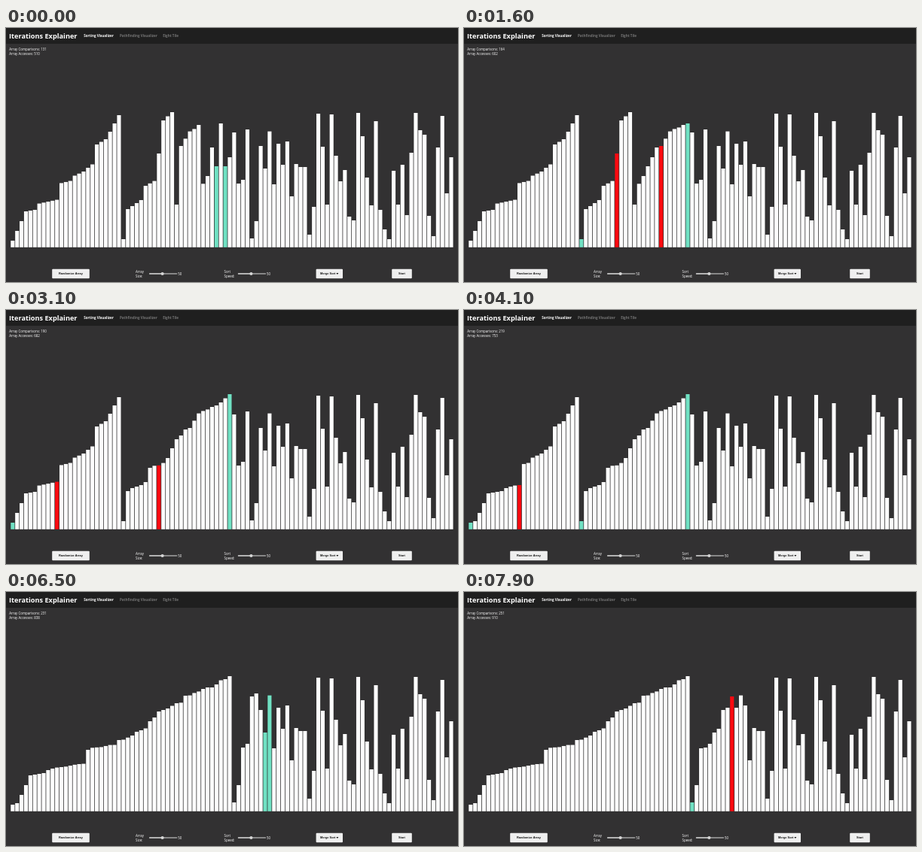
Write an HTML page that moves like this. It is 600x338 px and loops after 8000 ms.

```html
<!DOCTYPE html>
<html lang="en">
<head>
<meta charset="utf-8">
<title>Merge sort</title>
<style>
  html, body { margin: 0; width: 100%; height: 100%; overflow: hidden; background: #323132; }
  svg { display: block; width: 100vw; height: 100vh; }
  text { font: 4.45px "Open Sans", "Noto Sans", sans-serif; fill: #fff; white-space: pre; }
  .title { font-size: 9.2px; font-weight: 700; }
  .tab { font-size: 4.55px; font-weight: 700; fill: #757575; }
  .active { fill: #fff; }
  .button text { font: 700 3.9px "Liberation Sans", Arial, sans-serif; fill: #111; }
  .button rect { fill: #efefef; }
</style>
</head>
<body>
<svg viewBox="0 0 600 338" preserveAspectRatio="none">
  <defs>
    <g id="slider">
      <rect width="37.4" height="1.6" y="-.8" rx=".8" fill="#a4a4a4"/>
      <rect width="17" height="1.6" y="-.8" rx=".8" fill="#c2c2c2"/>
      <circle cx="17.6" r="2.1" fill="#d6d6d6"/>
    </g>
  </defs>
  <rect width="600" height="338" fill="#323132"/>
  <rect width="600" height="21" fill="#1f1f1f"/>
  <text class="title" x="4" y="14">Iterations Explainer</text>
  <text class="tab active" x="103.2" y="12.3">Sorting Visualizer</text>
  <text class="tab" x="151" y="12.3">Pathfinding Visualizer</text>
  <text class="tab" x="208.2" y="12.3">Eight Tile</text>
  <text id="comparisons" x="4.3" y="30"></text>
  <text id="accesses" x="4.3" y="36.4"></text>
  <g id="bars"></g>
  <g class="button">
    <rect x="61.2" y="320.8" width="49.6" height="12.4" rx="1"/>
    <text x="70" y="328.3">Randomize Array</text>
    <rect x="411.6" y="320.8" width="35.4" height="12.4" rx="1"/>
    <text x="417" y="328.3">Merge Sort</text>
    <path d="M438.4 326h3l-1.5 2z" fill="#111"/>
    <rect x="512.2" y="320.8" width="26.6" height="12.4" rx="1"/>
    <text x="521" y="328.3">Start</text>
  </g>
  <text x="172" y="325.8">Array</text>
  <text x="172" y="332.2">Size:</text>
  <use href="#slider" x="190" y="327"/>
  <text x="228.3" y="328.7">50</text>
  <text x="289.5" y="325.8">Sort</text>
  <text x="289.5" y="332.2">Speed:</text>
  <use href="#slider" x="307.8" y="327"/>
  <text x="346" y="328.7">50</text>
</svg>
<script>
const LOOP = 8000, TICK = 100;
const BASE = 291.8, LEFT = 6.3, PITCH = 5.88, BAR = 5.1;
const WHITE = "#fefefe", TEAL = "#70e1c3", RED = "#fb0a10";
const COMPARE_COST = 17, WRITE_COST = 40;

// An even slope of bar tops.
const slope = (count, from, to) =>
  Array.from({ length: count }, (_, n) => from + (to - from) * n / (count - 1));

// Top edge of every bar: sorted runs as slopes, then the shuffled rest.
const tops = [
  ...slope(4, 283, 244), ...slope(2, 243, 242), ...slope(5, 233.6, 228.6),
  ...slope(3, 206.4, 203.5), ...slope(3, 196.5, 191), ...slope(2, 186, 181.5),
  ...slope(3, 155, 148), ...slope(3, 138, 116),
  281, ...slope(4, 241, 229), ...slope(3, 210, 203.6), 167, ...slope(3, 123, 112),
  235, ...slope(3, 157, 137.6), ...slope(2, 134.4, 129),
  207.3, 197, 159, 132.4, 127, 184, 172,
  139, 207, 202, 135, 280, 257, 157, 187, 137.6, 208, 154, 182, 151,
  224, 181, 185, 185, 275, 238, 114, 158, 235, 115, 170, 204,
  189, 251, 256, 113, 144, 199, 236, 124, 242, 268, 281, 190, 235, 182, 249,
  166, 113, 136, 142, 250, 277, 159, 117, 220, 172
];

// Time against access count; a half means counted but not yet drawn.
const pace = [[0, 510], [1600, 602], [3100, 682], [4100, 753], [5300, 783], [6500, 838], [7900, 909.5]];

const states = [];
let comparisons = 129, accesses = 503, clock = 0;

function snap(cost, marks, step = accesses) {
  clock += cost;
  states.push({ clock, step, marks, comparisons, accesses, tops: tops.slice() });
}

function merge([lo, mid, hi]) {
  const merged = [];
  let i = lo, j = mid;
  const compareMarks = () => {
    const marks = new Map();
    if (j < hi) marks.set(hi - 1, TEAL);
    if (j > mid) marks.set(j - 1, RED);
    if (i > lo) marks.set(i - 1, RED);
    return marks.set(lo, TEAL);
  };
  while (i < mid && j < hi) {
    merged.push(tops[i] >= tops[j] ? tops[i++] : tops[j++]);
    comparisons++;
    accesses += 2;
    snap(COMPARE_COST, compareMarks());
  }
  let marks = compareMarks();
  for (const rest of [...tops.slice(i, mid), ...tops.slice(j, hi)]) {
    merged.push(rest);
    accesses++;
    snap(COMPARE_COST, marks);
  }
  merged.forEach((top, n) => {
    const k = lo + n;
    accesses++;
    snap(WRITE_COST / 2, marks, accesses - 0.5);
    tops[k] = top;
    marks = new Map();
    if (j < hi) marks.set(hi - 1, TEAL);
    if (k < mid) marks.set(mid, TEAL);
    marks.set(k, RED).set(lo, TEAL);
    snap(WRITE_COST / 2, marks);
  });
}

function plan(lo, hi) {
  if (hi - lo < 2) return [];
  const mid = (lo + hi) >> 1;
  return [...plan(lo, mid), ...plan(mid, hi), [lo, mid, hi]];
}

const merges = plan(0, tops.length);
const indexOfRange = (lo, hi) => merges.findIndex(m => m[0] === lo && m[2] === hi);
merges.slice(indexOfRange(46, 50), indexOfRange(50, 62) + 1).forEach(merge);

const lastWhere = test => states.filter(test).pop() || states[0];
const anchors = pace.map(([time, step]) => ({ time, clock: lastWhere(s => s.step <= step).clock }));

function clockAt(time) {
  let n = 0;
  while (n < anchors.length - 2 && anchors[n + 1].time <= time) n++;
  const a = anchors[n], b = anchors[n + 1];
  return a.clock + (time - a.time) / (b.time - a.time) * (b.clock - a.clock);
}

const group = document.getElementById("bars");
const bars = tops.map((_, n) => {
  const bar = document.createElementNS("http://www.w3.org/2000/svg", "rect");
  bar.setAttribute("x", (LEFT + n * PITCH).toFixed(2));
  bar.setAttribute("width", BAR);
  return group.appendChild(bar);
});
const comparisonText = document.getElementById("comparisons");
const accessText = document.getElementById("accesses");

function draw(time) {
  const now = clockAt(time) + 0.001;
  const state = lastWhere(s => s.clock <= now);
  bars.forEach((bar, n) => {
    bar.setAttribute("y", state.tops[n]);
    bar.setAttribute("height", BASE - state.tops[n]);
    bar.setAttribute("fill", state.marks.get(n) || WHITE);
  });
  comparisonText.textContent = "Array Comparisons: " + state.comparisons;
  accessText.textContent = "Array Accesses: " + state.accesses;
}

const start = performance.now();
let shown = -1;
function play() {
  const time = Math.floor((performance.now() - start) % LOOP / TICK) * TICK;
  if (time !== shown) draw(shown = time);
  requestAnimationFrame(play);
}
play();
</script>
</body>
</html>
```
